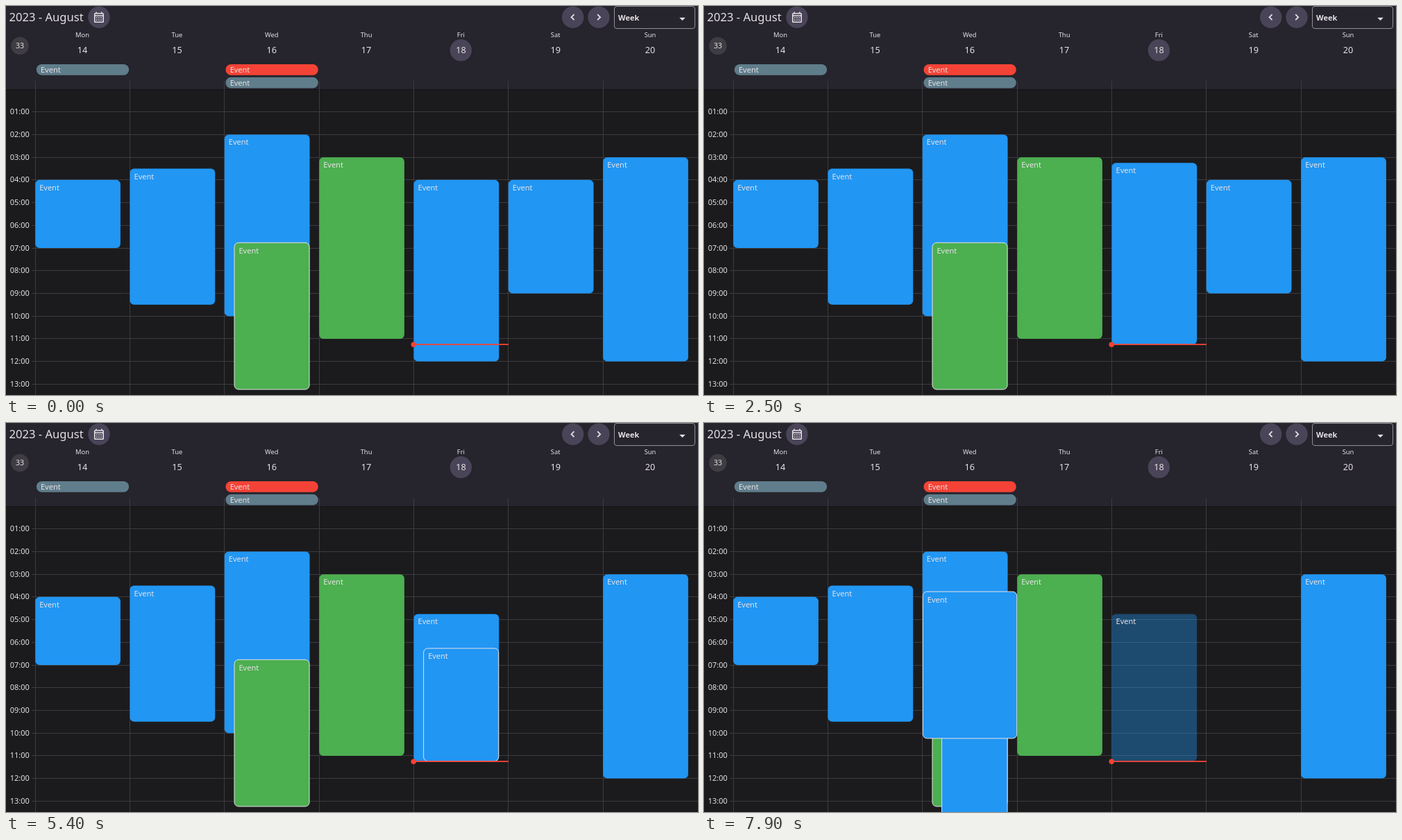
These frames come from a looping animation (997x561 px, 8000 ms). An HTML page:

```html
<!DOCTYPE html>
<html lang="en">
<head>
<meta charset="utf-8">
<title>Week planner</title>
<style>
html, body { margin: 0; width: 100%; height: 100%; overflow: hidden; background: #1b1b1d; }
svg { display: block; width: 997px; height: 561px; }
text { font-family: "Noto Sans", "Open Sans", sans-serif; font-size: 11px; font-weight: 500; fill: #e6e1e5; }
.mid { text-anchor: middle; }
</style>
</head>
<body>
<svg viewBox="0 0 997 561" xmlns="http://www.w3.org/2000/svg">
  <g id="back"></g>
  <g id="events"></g>
  <g fill="#f44336">
    <rect x="587" y="487.2" width="137" height="1.8"/>
    <circle cx="587.2" cy="488.2" r="3.7"/>
  </g>
  <g id="drag"></g>
</svg>
<script>
const LOOP = 8000, COL = 136.33, HOUR = 32.717;
const BLUE = '#2196f3', GREEN = '#4caf50', GREY = '#607d8b', RED = '#f44336';
const INK = '#e6e1e5', LINE = '#3c3b3f', ROUND = '#4a4458';
const colX = d => 42.2 + COL * d;
const hourY = h => 120 + HOUR * h;
const $ = id => document.getElementById(id);

const rect = (x, y, w, h, r, fill, more = '') =>
  `<rect x="${x}" y="${y}" width="${w}" height="${h}" rx="${r}" fill="${fill}" ${more}/>`;
const circle = (x, y, r, fill) => `<circle cx="${x}" cy="${y}" r="${r}" fill="${fill}"/>`;
const label = (x, y, s, more = '') => `<text x="${x}" y="${y}" ${more}>${s}</text>`;
const path = (d, more) => `<path d="${d}" ${more}/>`;

function card(x, w, start, end, fill, framed, ghost) {
  const y = hourY(start), h = hourY(end) - y, pad = framed ? 1 : 0;
  const alpha = ghost ? 'fill-opacity=".38"' : '';
  const box = framed
    ? rect(x + .5, y + .5, w - 1, h - 1, 6, fill, `stroke="${INK}" ${alpha}`)
    : rect(x, y, w, h, 6, fill, alpha);
  return box + label(x + 6 + pad, y + 15 + pad, 'Event');
}

// Overlapping events are indented by a tenth of the column per level.
function eventCard({ day, start, end, fill = BLUE, level = 0 }, ghost) {
  const inset = level * COL * .1;
  return card(colX(day) + inset, COL * .9 - inset, start, end, fill, level > 0, ghost);
}

function pill(day, y, fill) {
  const x = colX(day) + 1.6;
  return rect(x, y, 133.3, 15.8, 7.9, fill) + label(x + 6.2, y + 12, 'Event');
}

function drawBack() {
  let s = rect(0, 0, 997, 120.5, 0, '#26242c') + rect(0, 120, 997, 1, 0, '#131315');
  for (let h = 1; h <= 13; h++) {
    const y = Math.floor(hourY(h));
    s += rect(37, y, 960, 1, 0, LINE) + label(5.7, y + 4.4, String(h).padStart(2, '0') + ':00');
  }
  ['Mon', 'Tue', 'Wed', 'Thu', 'Fri', 'Sat', 'Sun'].forEach((name, d) => {
    const x = colX(d), cx = x + COL / 2 - .3;
    s += rect(Math.floor(x), 108, 1, 453, 0, LINE);
    if (d === 4) s += circle(cx, 63.8, 15.7, ROUND);
    s += label(cx, 45.2, name, 'class="mid" style="font-size:9.4px"');
    s += label(cx, 68.4, 14 + d, 'class="mid" style="font-size:12.7px"');
  });
  s += pill(0, 84, GREY) + pill(2, 84, RED) + pill(2, 102.8, GREY);
  s += circle(20, 57.5, 12.8, '#3f3d43') + label(20, 61.4, '33', 'class="mid" style="font-size:10.6px"');

  s += label(4.5, 22.4, '2023 - August', 'style="font-size:16.6px;font-weight:400"');
  for (const x of [134, 816.7, 854]) s += circle(x, 16.2, 15.7, ROUND);
  s += path('M19 4h-1V2h-2v2H8V2H6v2H5a2 2 0 0 0-2 2v14a2 2 0 0 0 2 2h14a2 2 0 0 0 2-2V6a2 2 0 0 0-2-2z' +
    'm0 16H5V10h14zm0-12H5V6h14z' +
    'M7 12h2v2H7zm4 0h2v2h-2zm4 0h2v2h-2zM7 16h2v2H7zm4 0h2v2h-2zm4 0h2v2h-2z',
    `transform="translate(124.6 6.9) scale(.78)" fill="${INK}" fill-rule="evenodd"`);
  s += path('M818.6 12.2l-4 4 4 4M852.2 12.2l4 4-4 4', `fill="none" stroke="${INK}" stroke-width="1.8"`);
  s += rect(876.5, .5, 116, 32, 3.5, 'none', 'stroke="#938f99"');
  s += label(882, 20.6, 'Week', 'style="font-weight:600"');
  s += path('M970.2 16.8h8.6l-4.3 4.2z', `fill="${INK}"`);
  return s;
}

const fixed = [
  { day: 0, start: 4, end: 7 },
  { day: 1, start: 3.5, end: 9.5 },
  { day: 2, start: 2, end: 10 },
  { day: 2, start: 6.75, end: 13.25, fill: GREEN, level: 1 },
  { day: 3, start: 3, end: 11, fill: GREEN },
  { day: 6, start: 3, end: 12 }
];

// Where each movable event rests, from a given time on.
const rests = {
  fri: [
    [0, { day: 4, start: 4, end: 12 }],
    [2500, { day: 4, start: 3.25, end: 11.25 }],
    [4300, { day: 4, start: 4.75, end: 11.25 }]
  ],
  sat: [
    [0, { day: 5, start: 4, end: 9 }],
    [5400, { day: 4, start: 6.25, end: 11.25, level: 1 }],
    [6700, { day: 2, start: 8.75, end: 13.75, level: 2 }]
  ]
};

// Pointer gestures: [time, start hour, day], snapped to quarter hours.
const gestures = [
  { id: 'fri', drop: 2500, steps: [[700, 4, 4], [800, 3.25, 4], [900, 2.25, 4], [1000, 1.25, 4], [1100, .75, 4],
    [1200, .5, 4], [1400, 1, 4], [1500, 2.25, 4], [1600, 4, 4], [1800, 4.5, 4], [2000, 4, 4], [2200, 3.25, 4]] },
  { id: 'fri', drop: 4300, resize: true, steps: [[3300, 3.25, 4], [3400, 4, 4], [3500, 5, 4], [3600, 6, 4],
    [3700, 6.5, 4], [3900, 5.5, 4], [4000, 4.75, 4]] },
  { id: 'sat', drop: 5400, steps: [[4900, 5.75, 4], [5000, 6.25, 4]] },
  { id: 'sat', drop: 6700, steps: [[6000, 6.25, 4], [6100, 7.25, 4], [6200, 8, 3], [6300, 8.5, 2], [6400, 8.75, 2]] },
  { id: 'fri', drop: LOOP, steps: [[7400, 4.75, 4], [7600, 5, 3], [7700, 4.5, 3], [7800, 4, 2], [7900, 3.75, 2]] }
];

const latest = (list, t) => list.filter(e => e[0] <= t).pop();

function draw(t) {
  const held = gestures.find(g => t >= g.steps[0][0] && t < g.drop);
  const at = id => latest(rests[id], t)[1];
  $('events').innerHTML = fixed.map(e => eventCard(e)).join('') +
    ['fri', 'sat'].map(id => eventCard(at(id), held && held.id === id)).join('');

  let s = '';
  if (held) {
    const e = at(held.id), [, start, day] = latest(held.steps, t);
    const end = held.resize ? e.end : start + e.end - e.start;
    s = card(colX(day), COL, start, end, BLUE, true);
  }
  $('drag').innerHTML = s;
}

$('back').innerHTML = drawBack();
const begin = performance.now();
let shown = -1;
function tick() {
  const step = Math.floor((performance.now() - begin) % LOOP / 100);
  if (step !== shown) draw((shown = step) * 100);
  requestAnimationFrame(tick);
}
tick();
</script>
</body>
</html>
```
